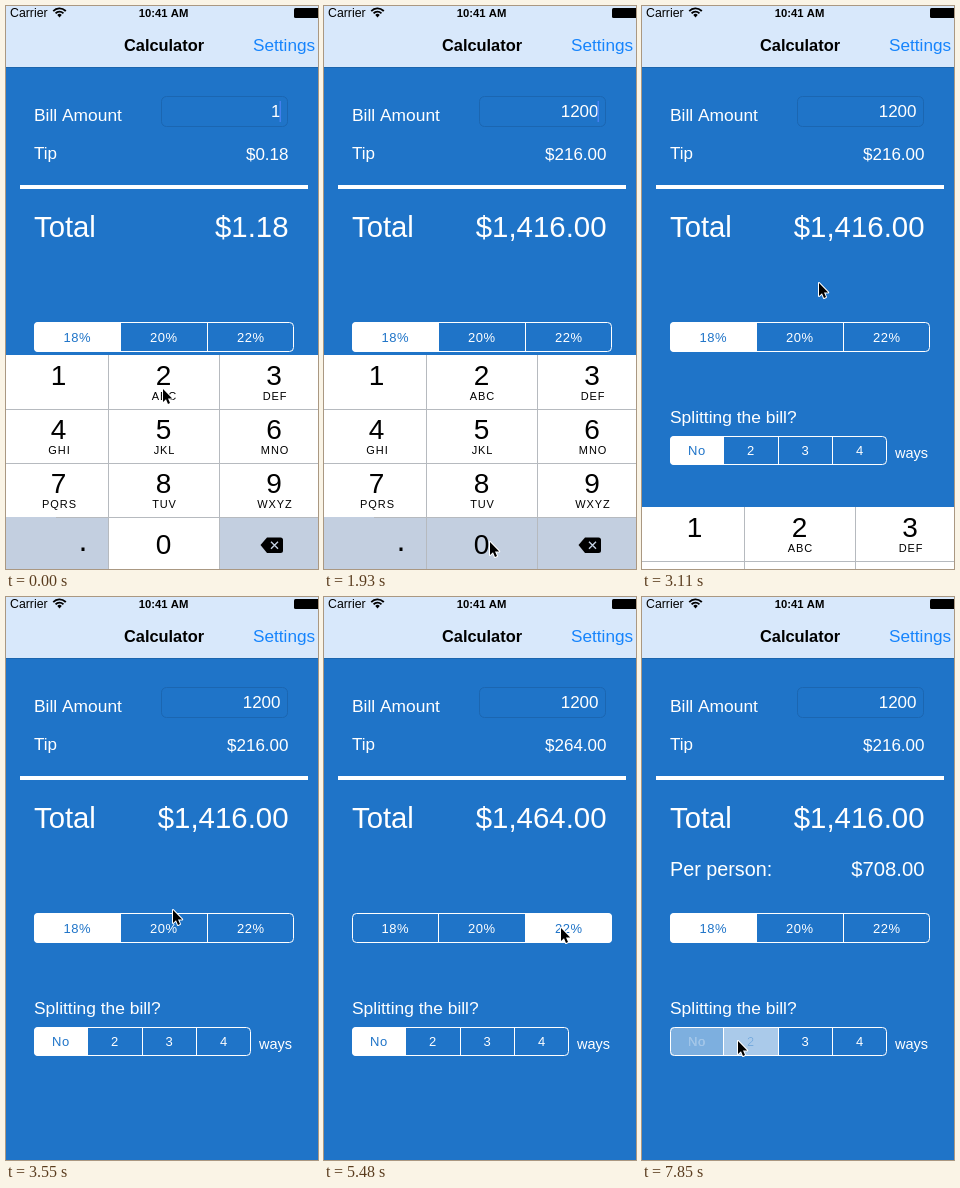
These frames come from a looping animation (312x563 px, 8 s). An HTML page with a canvas:

```html
<!DOCTYPE html>
<html lang="en">
<head>
<meta charset="utf-8">
<title>Tip calculator</title>
<style>
html, body { margin: 0; width: 100%; height: 100%; overflow: hidden; background: #1f74c8; }
canvas { display: block; }
</style>
</head>
<body>
<canvas width="312" height="563"></canvas>
<script>
const ctx = document.querySelector('canvas').getContext('2d');
const BLUE = '#1f74c8', PALE = '#d8e8fb', GREY = '#c3cfe0', LINE = '#b6babf';
const LOOP = 8000, TICK = 148.1, LAST_TICK = 53;

// [tick, x, y] stops of the pointer
const pointerPath = [
  [0, 157, 383], [2, 157, 383], [6, 166, 536], [15, 166, 536], [19, 177, 277],
  [23, 177, 277], [24, 167, 313], [26, 160, 332], [31, 160, 332], [34, 237, 331],
  [39, 237, 331], [43, 78, 331], [48, 78, 331], [51, 96, 444]
];
// [tick, value]
const typed = [[0, 1], [2, 12], [8, 120], [13, 1200]];
const rateTaps = [[-9, 0], [28, 1], [35, 2], [44, 0]];
const splitTaps = [[-9, 0], [52, 1]];
const rates = [0.18, 0.2, 0.22];
const letters = ['', 'ABC', 'DEF', 'GHI', 'JKL', 'MNO', 'PQRS', 'TUV', 'WXYZ'];
const columns = [0, 103, 214, 312], centers = [52.5, 157.5, 268];

const between = (n, from, to) => n >= from && n < to;
const latest = (list, tick) => list.filter(item => item[0] <= tick).pop()[1];
const money = value => '$' + value.toLocaleString('en-US',
  { minimumFractionDigits: 2, maximumFractionDigits: 2 });

function rect(x, y, w, h, color) {
  ctx.fillStyle = color;
  ctx.fillRect(x, y, w, h);
}

function text(label, x, y, size, { color = '#fff', align = 'left', bold = '', spacing = 0 } = {}) {
  ctx.font = `${bold} ${size}px "Liberation Sans", Arial, sans-serif`;
  ctx.textAlign = align;
  ctx.letterSpacing = spacing + 'px';
  ctx.fillStyle = color;
  ctx.fillText(label, x, y);
}

const right = (label, y, size, x = 282.5) => text(label, x, y, size, { align: 'right' });

function roundBox(x, y, w, h, radius) {
  ctx.beginPath();
  ctx.roundRect(x, y, w, h, radius);
}

function drawHeader() {
  rect(0, 0, 312, 61, PALE);
  rect(0, 61, 312, 1, '#1b65ae');
  text('Carrier', 4, 11, 12.3, { color: '#000' });
  text('10:41 AM', 157.5, 11, 11.3, { color: '#000', align: 'center', bold: 'bold' });
  ctx.strokeStyle = ctx.fillStyle = '#000';
  ctx.lineWidth = 1.8;
  for (const r of [8.6, 5.4]) {
    ctx.beginPath();
    ctx.arc(53.5, 11, r, -Math.PI * 0.76, -Math.PI * 0.24);
    ctx.stroke();
  }
  ctx.beginPath();
  ctx.moveTo(53.5, 11.5);
  ctx.arc(53.5, 11, 3, -Math.PI * 0.76, -Math.PI * 0.24);
  ctx.fill();
  roundBox(288, 2, 26, 10, 1.5);
  ctx.fill();
  text('Calculator', 158, 45, 16.4, { color: '#000', align: 'center', bold: 'bold' });
  text('Settings', 247, 45, 17.2, { color: '#1684fc' });
}

// How strongly a segment is lit: press tint, cross-fade, then settled
function segmentLevel(taps, tick, index) {
  const n = taps.findLastIndex(tap => tap[0] <= tick);
  const [start, chosen] = taps[n];
  const old = n ? taps[n - 1][1] : chosen;
  const age = tick - start;
  if (index === chosen) return n ? [0.2, 0.62][age] ?? 1 : 1;
  if (index === old) return [1, 0.42][age] ?? 0;
  return 0;
}

function drawSegments(labels, edges, y, h, taps, tick) {
  const left = edges[0], width = edges[edges.length - 1] - left;
  ctx.save();
  roundBox(left, y, width, h, 4);
  ctx.clip();
  labels.forEach((label, i) => {
    const x = edges[i], w = edges[i + 1] - x, level = segmentLevel(taps, tick, i);
    const place = [label, x + w / 2 + 0.3, y + h / 2 + 4.7, 13];
    rect(x, y, w, h, `rgba(255,255,255,${level})`);
    const style = { align: 'center', spacing: 0.5 };
    if (level < 1) text(...place, style);
    ctx.globalAlpha = level;
    text(...place, { ...style, color: BLUE });
    ctx.globalAlpha = 1;
    if (i) rect(x, y, 1, h, '#fff');
  });
  ctx.restore();
  ctx.strokeStyle = '#fff';
  ctx.lineWidth = 1;
  roundBox(left + 0.5, y + 0.5, width - 1, h - 1, 4);
  ctx.stroke();
}

function drawForm(tick) {
  const bill = latest(typed, tick);
  const tip = bill * rates[latest(rateTaps, tick - 1)];
  const total = bill + tip;

  text('Bill Amount', 28, 115, 17.4);
  ctx.strokeStyle = '#1b66b1';
  ctx.lineWidth = 1;
  roundBox(155.5, 90.5, 126, 30, 5);
  ctx.stroke();
  right(bill, 111, 17, 274.5);
  if (tick < 20 && !between(tick, 5, 7)) rect(273.5, 95, 1.5, 21, '#4580ee');
  text('Tip', 28, 153, 17);
  right(money(tip), 154, 17);
  rect(14, 179, 288, 4, '#fff');
  text('Total', 28, 231, 29.3);
  right(money(total), 231, 29.4);
  if (latest(splitTaps, tick - 1)) {
    text('Per person:', 28, 279, 19.8);
    right(money(total / 2), 279, 20.3);
  }
  drawSegments(['18%', '20%', '22%'], [28, 114, 201, 288], 316, 30, rateTaps, tick);
  text('Splitting the bill?', 28, 417, 17.4);
  drawSegments(['No', '2', '3', '4'], [28, 81, 136, 190, 245], 430, 29, splitTaps, tick);
  text('ways', 253, 452, 14.5);
}

function drawKey(index, pressed) {
  const col = index % 3, row = Math.floor(index / 3), y = 349 + row * 54;
  const special = index === 9 || index === 11;
  const x = columns[col], cx = centers[col], lineX = index === 9 ? 50 : x;
  rect(x, y, columns[col + 1] - x, 54, pressed || special ? GREY : '#fff');
  if (row) rect(lineX, y, columns[col + 1] - lineX, 1, LINE);
  if (col) rect(x - 1, y, 1, 54, LINE);
  if (special) return;
  const center = { color: '#000', align: 'center' };
  if (row === 3) return text('0', cx, 548, 28, center);
  text(index + 1, cx, y + 30, 28, center);
  text(letters[index], cx + 1, y + 45, 11, { ...center, spacing: 0.9 });
}

function drawKeyboard(tick) {
  const p = Math.min(1, Math.max(0, (tick - 20) / 3));
  if (p === 1) return;
  ctx.save();
  ctx.translate(0, 216 * (1 - (1 - p) ** 3));
  const two = between(tick, 1, 3);
  const zero = between(tick, 7, 9) || between(tick, 12, 14);
  for (let i = 0; i < 12; i++) drawKey(i, i === 1 && two || i === 10 && zero);
  rect(75.5, 541.5, 3, 3.5, '#000');
  ctx.fillStyle = '#000';
  ctx.beginPath();
  ctx.moveTo(254.5, 539);
  ctx.lineTo(261, 531.5);
  ctx.arcTo(277, 531.5, 277, 547, 2.5);
  ctx.arcTo(277, 547, 261, 547, 2.5);
  ctx.lineTo(261, 547);
  ctx.fill();
  ctx.strokeStyle = GREY;
  ctx.lineWidth = 1.4;
  ctx.beginPath();
  for (const s of [-1, 1]) {
    ctx.moveTo(265, 539.3 - 3.5 * s);
    ctx.lineTo(272, 539.3 + 3.5 * s);
  }
  ctx.stroke();
  ctx.restore();
}

function drawPointer(tick) {
  const n = pointerPath.findLastIndex(stop => stop[0] <= tick);
  const a = pointerPath[n], b = pointerPath[n + 1] || a;
  const p = (tick - a[0]) / (b[0] - a[0] || 1);
  const ease = p * p * (3 - 2 * p);
  const arrow = new Path2D('M0 0V13L3 10.2L5 15L7 14.1L5 9.5H9.2Z');
  ctx.save();
  ctx.translate(a[1] + (b[1] - a[1]) * ease, a[2] + (b[2] - a[2]) * ease);
  ctx.strokeStyle = '#fff';
  ctx.lineWidth = 2;
  ctx.lineJoin = 'round';
  ctx.stroke(arrow);
  ctx.fillStyle = '#000';
  ctx.fill(arrow);
  ctx.restore();
}

function draw(now) {
  const tick = Math.min(LAST_TICK, Math.floor((now % LOOP + 8) / TICK));
  rect(0, 0, 312, 563, BLUE);
  drawHeader();
  drawForm(tick);
  drawKeyboard(tick);
  drawPointer(tick);
}

const start = performance.now();
function frame() {
  draw(performance.now() - start);
  requestAnimationFrame(frame);
}
frame();
</script>
</body>
</html>
```
